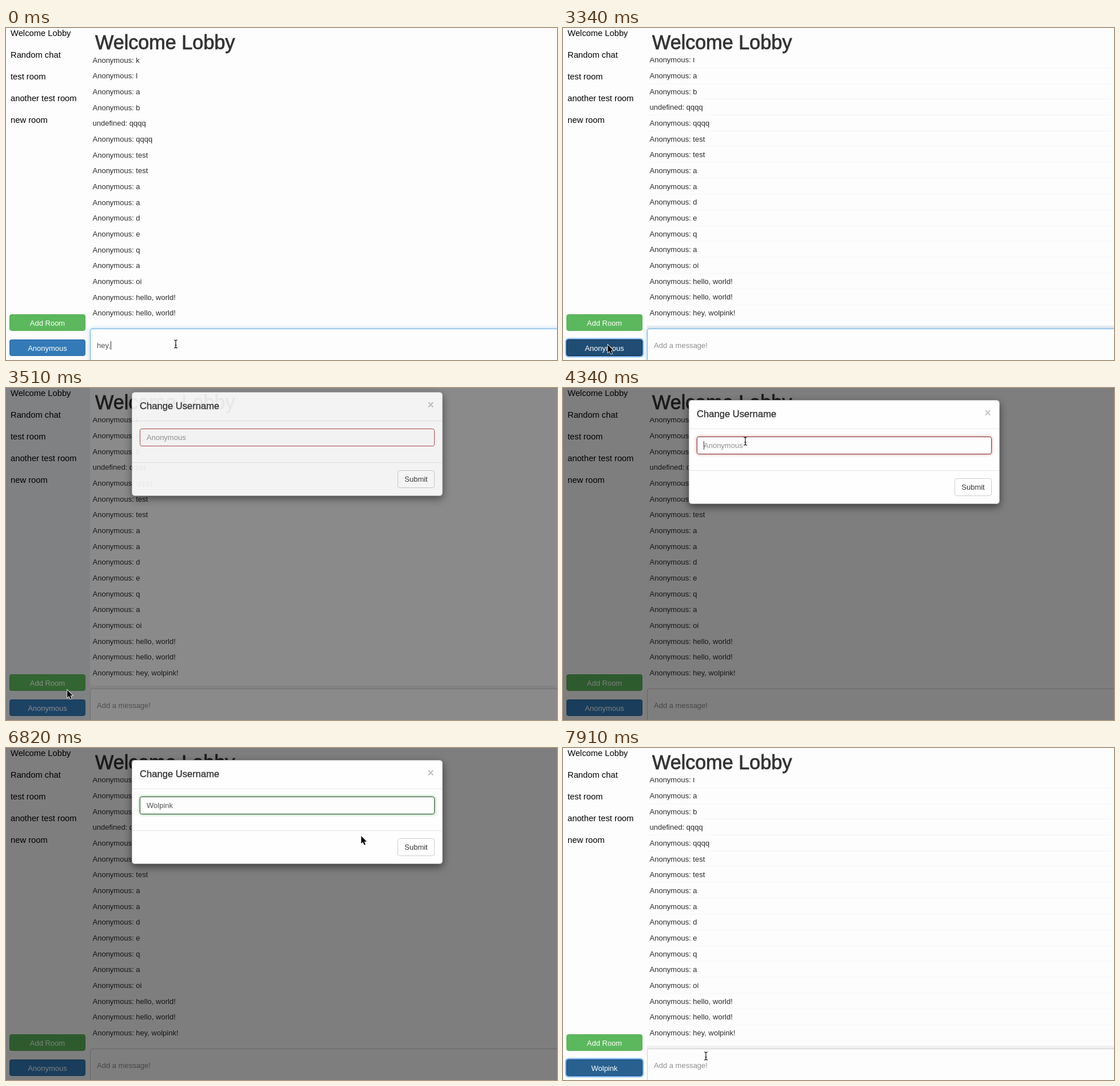
Write an HTML page that moves like this. It is 964 by 581 pixels and loops after 8 s.

```html
<!DOCTYPE html>
<html lang="en">
<head>
<meta charset="utf-8">
<title>Chat lobby</title>
<style>
  html, body { margin: 0; width: 100%; height: 100%; overflow: hidden; background: #fdfdfd; }
  body { position: relative; font: 13px "Liberation Sans", Arial, sans-serif; color: #333; }
  body * { position: absolute; box-sizing: border-box; white-space: pre; }
  span, i, b { position: static !important; font-weight: normal; }

  aside { left: 0; top: 0; width: 147px; height: 581px; }
  .fading aside { background: #e9ebf0; }
  .room { left: 8px; font-size: 14.75px; line-height: 38.1px; color: #000; }
  h1 { left: 156px; top: 5px; margin: 0; font-size: 34.2px; font-weight: normal; line-height: 40px; -webkit-text-stroke: .8px; }

  #list { left: 147px; top: 52px; width: 817px; height: 469px; overflow: hidden; }
  #rows { left: 0; top: -9.3px; width: 100%; }
  .row { left: 0; width: 100%; height: 27.66px; padding-left: 4.5px; line-height: 27.66px; color: #2b2b2b; border-bottom: 1px solid transparent; }
  .lined .row { border-color: #f6f6f6; }
  #strip { left: 147px; top: 521px; width: 817px; height: 6px; background: #f0f0f2; visibility: hidden; }
  .lined #strip, .fading #strip { visibility: visible; }

  .btn { border: 1px solid; border-radius: 3.7px; text-align: center; }
  aside .btn { left: 6px; width: 133px; height: 29px; line-height: 29px; color: #fff; }
  #add { top: 501px; background: #5cb85c; border-color: #4cae4c; }
  #add.hover { background: #449d44; border-color: #398439; }
  #user { top: 545px; background: #337ab7; border-color: #2e6da4; }
  #user.hover { background: #286090; border-color: #204d74; }
  #user.active { background: #204d74; border-color: #122b40; }
  .ring { box-shadow: 0 0 2px 2px #62a4ea; }

  .field { border: 1px solid #ccc; color: #555; background: #fdfdfd; }
  .field b { color: #8e8e8e; }
  .caret { display: inline-block; width: 1px; height: 15px; margin-right: -1px; vertical-align: -3px; background: #333; }
  #message { left: 147px; top: 526px; width: 900px; height: 90px; padding-left: 11px; border-radius: 4px; line-height: 58px; }
  #message.focus { border-color: #66afe9; box-shadow: 0 0 7px rgba(102,175,233,.6); }
  .typo { text-decoration: underline dotted #f0403a 2px; text-underline-offset: 3px; text-decoration-skip-ink: none; }

  #backdrop { left: 0; top: 0; width: 964px; height: 581px; background: #000; }
  #modal { left: 220px; top: 21px; width: 544px; height: 182px; background: #fefefe; border: 1px solid rgba(0,0,0,.25); border-radius: 5.5px; box-shadow: 0 5px 14px rgba(0,0,0,.5); }
  #title { left: 13px; top: 11px; font-size: 16.6px; line-height: 26px; -webkit-text-stroke: .35px; }
  #close { left: 516.5px; top: 8px; font: bold 19.4px/26px "Liberation Sans", Arial, sans-serif; color: #c4c4c4; }
  .rule { left: 0; width: 100%; height: 1px; background: #e5e5e5; }
  #name { left: 13px; top: 63px; width: 516px; height: 31px; padding-left: 11px; border-radius: 3.7px; line-height: 29px; border-color: #a94442; }
  #name.focus { border-color: #843534; box-shadow: 0 0 5px #ce8483; }
  #name.valid { border-color: #3c763d; }
  #name.valid.focus { border-color: #2b542c; box-shadow: 0 0 5px #67b168; }
  #submit { left: 464px; top: 136px; width: 65px; height: 31px; line-height: 29px; border-color: #ccc; background: #fff; }
  #submit.hover { background: #e2e2e2; border-color: #adadad; }
  #cursor { left: 0; top: 0; overflow: visible; }
</style>
</head>
<body>
<h1>Welcome Lobby</h1>
<div id="list"><div id="rows"></div></div>
<div id="strip"></div>
<div id="message" class="field"></div>
<aside>
  <div id="add" class="btn">Add Room</div>
  <div id="user" class="btn"></div>
</aside>
<div id="backdrop"></div>
<div id="modal">
  <div id="title">Change Username</div>
  <div id="close">×</div>
  <div class="rule" style="top:49px"></div>
  <div id="name" class="field"></div>
  <div class="rule" style="top:122px"></div>
  <div id="submit" class="btn">Submit</div>
</div>
<svg id="cursor" width="20" height="20">
  <path id="arrow" d="M0 0V13.4L3 10.6 5.3 15.8 7.5 14.9 5.3 9.8H9.5Z" fill="#000" stroke="#fff" paint-order="stroke" stroke-width="1.6"/>
  <path id="beam" d="M-3-7Q0-7 0-5Q0-7 3-7M0-5V5M-3 7Q0 7 0 5Q0 7 3 7M-1.7 2H1.7" fill="none" stroke="#111" stroke-width="1.2"/>
</svg>
<script>
const LOOP = 8000, ROW = 27.66, USER = 'Wolpink', NICK = USER.toLowerCase();
const SEND = 2090, OPEN = 3340, FOCUS = 4160, NAMING = 4880, FIXING = 5780, SUBMIT = 7170, CLOSE = 7521;

const $ = id => document.getElementById(id);
const rooms = ['Welcome Lobby', 'Random chat', 'test room', 'another test room', 'new room'];
const words = ['k', 'l', 'a', 'b', 'qqqq', 'qqqq', 'test', 'test', 'a', 'a', 'd', 'e', 'q', 'a', 'oi',
  'hello, world!', 'hello, world!', `hey, ${NICK}!`];

function addText(parent, className, top, text) {
  const el = document.createElement('div');
  el.className = className;
  el.style.top = top + 'px';
  el.textContent = text;
  parent.append(el);
}
rooms.forEach((name, i) => addText(document.querySelector('aside'), 'room', i * 38.1 - 10, name));
words.forEach((word, i) => addText($('rows'), 'row', i * ROW, `${i === 4 ? 'undefined' : 'Anonymous'}: ${word}`));

const progress = (t, from, length) => Math.min(1, Math.max(0, (t - from) / length));
const easeOut = (p, power = 3) => 1 - (1 - p) ** power;
const during = (t, from, to) => t >= from && t < to;
const typed = (text, t, from, gap) => text.slice(0, Math.max(0, Math.floor((t - from) / gap) + 1));

// The caret blinks from the latest key press or focus.
const blink = (t, ...presses) => (t - Math.max(...presses.filter(press => press <= t))) % 960 < 480;

// Each sweep of the pointer: start, end, destination.
const sweeps = [
  [2330, 2850, 120, 524], [2850, 3160, 78, 555], [OPEN, 3510, 106, 531],
  [3510, 4030, 319, 93], [6650, 7080, 706, 171], [CLOSE, 7910, 250, 539]
];
function pointer(t) {
  let x = 297, y = 553;
  for (const [from, to, toX, toY] of sweeps) {
    const p = easeOut(progress(t, from, to - from));
    x += (toX - x) * p;
    y += (toY - y) * p;
  }
  return [x, y];
}

function draftAt(t) {
  if (t >= SEND) return '';
  return 'hey,' + typed(` ${NICK}!`, t, 180, 90).replace(/\w+(?=!)/, '<span class="typo">$&</span>');
}
function nameAt(t) {
  return t < FIXING ? typed('Wor', t, NAMING, 180) : USER[0] + typed(USER.slice(1), t, FIXING, 87);
}

function fill(field, text, hint, caret) {
  const mark = caret ? '<i class="caret"></i>' : '';
  const html = text ? text + mark : `${mark}<b>${hint}</b>`;
  if (field.shown !== html) field.innerHTML = field.shown = html;
}
function setClasses(el, states) {
  for (const name in states) el.classList.toggle(name, states[name]);
}

function render(t) {
  const leave = progress(t, CLOSE, 85);
  const opacity = progress(t, 3375, 150) - leave;
  const slide = 46 * (easeOut(progress(t, 3375, 300), 2) - 1) - 80 * leave;
  const open = opacity > 0, closed = leave === 1;
  const [x, y] = pointer(t);
  const over = (left, top, right, bottom) => x >= left && x < right && y >= top && y < bottom;

  fill($('message'), draftAt(t), 'Add a message!', t < OPEN && blink(t, 0, 450, 930, SEND));
  setClasses($('message'), { focus: t < 3430 });
  $('rows').style.transform = `translateY(${t < 2180 ? 0 : -ROW - .6}px)`;
  setClasses(document.body, { lined: t >= OPEN && !open, fading: open && opacity < 1 });

  const pressed = during(t, OPEN, 3430);
  setClasses($('add'), { hover: !open && over(6, 501, 139, 530) });
  setClasses($('user'), {
    hover: closed || !open && over(6, 545, 139, 574),
    active: pressed,
    ring: closed || pressed
  });
  $('user').textContent = t < CLOSE ? 'Anonymous' : USER;

  const name = nameAt(t), editing = during(t, FOCUS, SUBMIT);
  fill($('name'), name, 'Anonymous', editing && blink(t, FOCUS, NAMING, 5240, FIXING, 6210));
  setClasses($('name'), { focus: editing, valid: name !== '' });
  setClasses($('submit'), { hover: t >= SUBMIT || over(685, 158, 750, 189), ring: t >= SUBMIT });
  $('backdrop').style.opacity = opacity / 2;
  $('modal').style.opacity = opacity;
  $('modal').style.transform = `translateY(${Math.round(slide)}px)`;

  const beam = open ? over(234, 85, 750, 116) : over(147, 526, 964, 581);
  $('beam').style.display = beam ? '' : 'none';
  $('arrow').style.display = beam ? 'none' : '';
  $('cursor').style.transform = `translate(${x}px, ${y}px)`;
}

const start = performance.now();
function tick() {
  render((performance.now() - start) % LOOP);
  requestAnimationFrame(tick);
}
tick();
</script>
</body>
</html>
```
